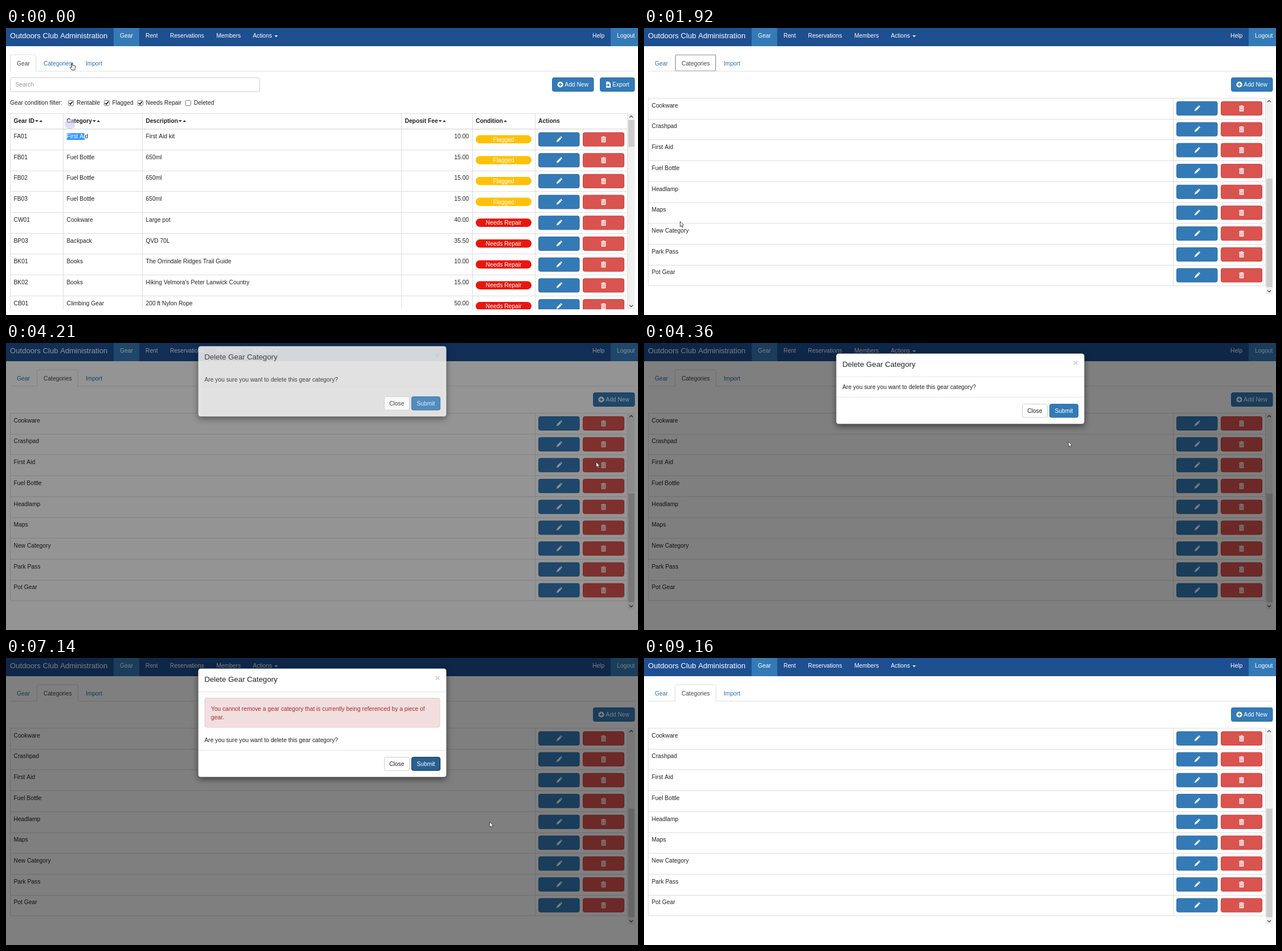
An HTML page with a canvas that plays this animation: 1110x505 px, repeating every 9.66 s.

```html
<!DOCTYPE html>
<html lang="en">
<head>
<meta charset="utf-8">
<title>Gear administration</title>
<style>
html, body { margin: 0; width: 100%; height: 100%; overflow: hidden; background: #fff; }
canvas { display: block; width: 1110px; height: 505px; }
</style>
</head>
<body>
<canvas id="stage" width="1110" height="505"></canvas>
<script>
const ctx = document.getElementById('stage').getContext('2d');
const W = 1110, H = 505, LOOP = 9660, ROW = 36.7, SIZE = 10.28;
const FAMILY = '"Liberation Sans", Arial, sans-serif';
const BLUE = '#337ab7', LINE = '#ddd', INK = '#222';
const COLUMNS = [7, 100, 239, 694, 819, 929, 1091];

const GEAR = [
  ['FA01', 'First Aid', 'First Aid kit', '10.00'],
  ['FB01', 'Fuel Bottle', '650ml', '15.00'],
  ['FB02', 'Fuel Bottle', '650ml', '15.00'],
  ['FB03', 'Fuel Bottle', '650ml', '15.00'],
  ['CW01', 'Cookware', 'Large pot', '40.00'],
  ['BP03', 'Backpack', 'QVD 70L', '35.50'],
  ['BK01', 'Books', 'The Orrindale Ridges Trail Guide', '10.00'],
  ['BK02', 'Books', "Hiking Velmora's Peter Lanwick Country", '15.00'],
  ['CB01', 'Climbing Gear', '200 ft Nylon Rope', '50.00']
];
const CATEGORIES = ['Cookware', 'Crashpad', 'First Aid', 'Fuel Bottle', 'Headlamp',
  'Maps', 'New Category', 'Park Pass', 'Pot Gear'];

// Pointer path: time, x, y
const PATH = [
  [0, 116, 61], [400, 116, 61], [760, 172, 195], [900, 180, 222], [1040, 184, 270],
  [1180, 171, 305], [1440, 110, 363], [1920, 63, 340], [2280, 66, 278], [2520, 21, 212],
  [2880, 58, 212], [3000, 62, 211], [3250, 150, 215], [3490, 803, 220], [3730, 1036, 209],
  [4210, 1036, 209], [4360, 745, 173], [4510, 728, 132], [4650, 720, 121], [4790, 724, 118],
  [5910, 724, 118], [6390, 890, 313], [7020, 890, 313], [7620, 684, 187], [7870, 684, 187],
  [7990, 712, 232]
];

const within = (t, from, to) => t >= from && t < to;

function box(x, y, w, h, color) {
  ctx.fillStyle = color;
  ctx.fillRect(x, y, w, h);
}

function text(str, x, y, color = INK, size = SIZE, align = 'left', weight = 'normal') {
  ctx.font = `${weight} ${size}px ${FAMILY}`;
  ctx.textAlign = align;
  ctx.fillStyle = color;
  ctx.fillText(str, x, y);
}

function shape(points, fill, stroke) {
  ctx.beginPath();
  points.forEach(([x, y]) => ctx.lineTo(x, y));
  ctx.closePath();
  if (fill) { ctx.fillStyle = fill; ctx.fill(); }
  if (stroke) { ctx.strokeStyle = stroke; ctx.lineWidth = 1; ctx.stroke(); }
}

function panel(x, y, w, h, r, fill, stroke) {
  ctx.beginPath();
  ctx.roundRect(x + .5, y + .5, w - 1, h - 1, r);
  if (fill) { ctx.fillStyle = fill; ctx.fill(); }
  if (stroke) { ctx.strokeStyle = stroke; ctx.lineWidth = 1; ctx.stroke(); }
}

function disc(x, y, r, color) {
  ctx.beginPath();
  ctx.arc(x, y, r, 0, 7);
  ctx.fillStyle = color;
  ctx.fill();
}

function caret(x, y, dir, color = INK) {
  shape([[x - 3, y - dir * 1.5], [x + 3, y - dir * 1.5], [x, y + dir * 1.5]], color);
}

function selected(str, x, y, from, to) {
  text(str, x, y);
  ctx.save();
  ctx.beginPath();
  ctx.rect(from, y - 9, to - from, 12);
  ctx.clip();
  box(from, y - 9, to - from, 12, '#39f');
  text(str, x, y, '#fff');
  ctx.restore();
}

function pencil(x, y) {
  ctx.save();
  ctx.translate(x, y);
  ctx.rotate(Math.PI / 4);
  box(-1.7, -3.7, 3.4, 7.2, '#fff');
  box(-1.7, -6.2, 3.4, 1.8, '#fff');
  shape([[-1.7, 3.5], [1.7, 3.5], [0, 6.8]], '#fff');
  ctx.restore();
}

function trash(x, y, back) {
  box(x - 1.7, y - 5.3, 3.4, 1.2, '#fff');
  box(x - 4.5, y - 4.3, 9, 1.4, '#fff');
  box(x - 3.8, y - 2.2, 7.6, 7.4, '#fff');
  for (const dx of [-2.3, -.4, 1.5]) box(x + dx, y - 1, .8, 5, back);
}

function rowButtons(y, mode) {
  const [fill, edge] = {
    hover: ['#c9302c', '#ac2925'],
    active: ['#ac2925', '#761c19'],
    focus: ['#c9302c', '#761c19']
  }[mode] || ['#d9534f', '#d43f3a'];
  panel(935, y - 12.5, 72.5, 25, 3, BLUE, '#2e6da4');
  pencil(971.5, y);
  panel(1013, y - 12.5, 73, 25, 3, fill, edge);
  trash(1049.5, y, fill);
}

function primary(x, w, label, labelX) {
  panel(x, 87, w, 25, 3, BLUE, '#2e6da4');
  text(label, labelX, 103.3, '#fff');
}

function addNew(x) {
  primary(x, 73.5, 'Add New', x + 22.3);
  disc(x + 14.5, 99.5, 5.1, '#fff');
  box(x + 11.5, 98.7, 6, 1.6, BLUE);
  box(x + 13.7, 96.5, 1.6, 6, BLUE);
}

function scrollbar(top, bottom, from, to) {
  box(1092, top, 12, bottom - top, '#f1f1f1');
  box(1093, from, 11, to - from, '#cdcdcd');
  ctx.strokeStyle = '#505050';
  ctx.lineWidth = 1.3;
  for (const [y, d] of [[top + 6, 1], [bottom - 6, -1]]) {
    ctx.beginPath();
    ctx.moveTo(1095, y + d * 1.5);
    ctx.lineTo(1098, y - d * 1.5);
    ctx.lineTo(1101, y + d * 1.5);
    ctx.stroke();
  }
}

function navbar() {
  box(0, 0, W, 32, '#1d4f91');
  box(189, 0, 45, 32, BLUE);
  box(1062, 0, 48, 32, BLUE);
  text('Outdoors Club Administration', 7, 18, '#fff', 13.12);
  [['Gear', 200], ['Rent', 245], ['Reservations', 288], ['Members', 369.5],
   ['Actions', 433.5], ['Help', 1030], ['Logout', 1073]]
    .forEach(([label, x]) => text(label, x, 17, '#fff'));
  caret(474.5, 14.5, 1, '#fff');
}

function tabs(t) {
  const onGear = t < 400;
  const [x, w] = onGear ? [7, 46] : [54, 73];
  if (within(t, 120, 400)) panel(54, 47, 73, 29, 3, '#eee', '#bbb');
  box(7, 75.5, 1097, 1, LINE);
  panel(x, 46.5, w, 32, 3, '#fff', LINE);
  box(x - 1, 76.5, w + 2, 3, '#fff');
  if (within(t, 400, 2520)) panel(55, 47, 71, 29, 0, null, '#999');
  text('Gear', 19, 65.5, onGear ? '#444' : '#2a71b0');
  text('Categories', 66, 65.5, onGear ? '#2a71b0' : '#444');
  text('Import', 140, 65.5, '#2a71b0');
}

function checkbox(x, label, labelX, on) {
  panel(x, 127, 10, 10, 1, '#fff', '#777');
  if (on) {
    ctx.beginPath();
    ctx.moveTo(x + 2, 132);
    ctx.lineTo(x + 4.2, 134.3);
    ctx.lineTo(x + 8, 129.3);
    ctx.strokeStyle = '#111';
    ctx.lineWidth = 1.6;
    ctx.stroke();
  }
  text(label, labelX, 135);
}

function gearPane() {
  panel(7, 87, 439, 25.5, 3, '#fff', '#ccc');
  text('Search', 16.5, 103.3, '#999');
  addNew(959);
  primary(1043, 61.5, 'Export', 1065);
  shape([[1054, 94.5], [1059, 94.5], [1062, 97.5], [1062, 105], [1054, 105]], '#fff');
  box(1052, 99.7, 6, 1.4, BLUE);
  shape([[1057, 97.8], [1060.3, 100.4], [1057, 103]], BLUE);

  text('Gear condition filter:', 7, 134.5);
  checkbox(109, 'Rentable', 124, true);
  checkbox(172, 'Flagged', 186.5, true);
  checkbox(231, 'Needs Repair', 245.5, true);
  checkbox(315, 'Deleted', 330, false);

  ctx.save();
  ctx.beginPath();
  ctx.rect(0, 150, W, 345);
  ctx.clip();
  COLUMNS.forEach(x => box(x, 150, 1, 345, LINE));
  box(7, 150, 1085, 1, LINE);
  box(7, 177, 1085, 1.5, LINE);
  [['Gear ID', 13.5, 54], ['Category', 106.5, 155], ['Description', 245.5, 306],
   ['Deposit Fee', 700.5, 762.5], ['Condition', 825], ['Actions', 935]]
    .forEach(([label, x, sort]) => {
      text(label, x, 167, INK, SIZE, 'left', 'bold');
      if (sort) { caret(sort, 163.7, 1); caret(sort + 7.3, 163.7, -1); }
    });
  caret(877, 163.7, -1);

  GEAR.forEach(([id, category, about, fee], i) => {
    const y = 177.5 + i * ROW, base = Math.round(y + 16.5), flagged = i < 4;
    if (i) box(7, Math.round(y - .4), 1085, 1, LINE);
    text(id, 13.5, base);
    if (i) text(category, 106.5, base);
    else selected(category, 106.5, base, 106.5, 138.5);
    text(about, 245.5, base);
    text(fee, 813, base, INK, SIZE, 'right');
    ctx.beginPath();
    ctx.roundRect(825, y + 11, 98, 14.6, 7.3);
    ctx.fillStyle = flagged ? '#ffc107' : '#e8170c';
    ctx.fill();
    text(flagged ? 'Flagged' : 'Needs Repair', 874, y + 22, '#fff', SIZE, 'center');
    rowButtons(y + 18.5);
  });
  ctx.restore();
  scrollbar(150, 495, 162, 209);
}

function trashMode(t) {
  if (within(t, 3730, 3970)) return 'hover';
  if (within(t, 3970, 4210)) return 'active';
  if (within(t, 8250, 9160)) return 'focus';
}

function categoryPane(t, px) {
  addNew(1031);
  [7, 929, 1091].forEach(x => box(x, 123, 1, 331, LINE));
  for (let i = 0; i < 10; i++) box(7, Math.round(123 + i * ROW), 1085, 1, LINE);
  CATEGORIES.forEach((name, i) => {
    const y = 123 + i * ROW, base = Math.round(y + 16.7);
    if (i === 2 && within(t, 2640, 3970)) selected(name, 13.5, base, 20, t < 2880 ? Math.min(51, px) : 51);
    else text(name, 13.5, base);
    rowButtons(y + 18.5, i === 2 && trashMode(t));
  });
  scrollbar(123, 469, 265, 456);
}

function page(t, px) {
  navbar();
  tabs(t);
  if (t < 640) gearPane();
  else categoryPane(t, px);
  // Veil over the pane while it fades
  const veil = t < 400 ? 0 : t < 520 ? .35 : t < 640 ? .9 : t < 760 ? .7 : t < 900 ? .15 : 0;
  if (veil) box(0, 80, W, H - 80, `rgba(255,255,255,${veil})`);
  if (t < 260) {
    ctx.globalAlpha = t < 120 ? .6 : .25;
    disc(112.5, 169, 9.3, '#c9cbf3');
  }
  if (within(t, 3000, 3970)) disc(81, 193, 9.2, '#d3d2f5');
  ctx.globalAlpha = 1;
}

function modal(t) {
  const entering = t < 4360;
  const failed = within(t, 5290, 7990);
  const top = entering ? 5 : t < 7990 ? 18 : 17.5;
  const d = failed ? 67 : 0;
  ctx.save();
  ctx.translate(0, top - 18);
  ctx.globalAlpha = entering ? .82 : t < 7990 ? 1 : .985;

  ctx.save();
  ctx.shadowColor = 'rgba(0,0,0,.5)';
  ctx.shadowBlur = 11;
  ctx.shadowOffsetY = 4;
  panel(337, 18, 437, 125 + d, 4.5, '#fff');
  ctx.restore();
  panel(337, 18, 437, 125 + d, 4.5, null, 'rgba(0,0,0,.2)');
  text('Delete Gear Category', 348.5, 42.3, INK, 13.2);
  text('×', 758, 40, '#ccc', 15.4, 'center', 'bold');
  box(338, 59, 435, 1, '#e5e5e5');

  if (failed) {
    panel(348.5, 70, 414, 52.5, 3, '#f2dede', '#ebccd1');
    text('You cannot remove a gear category that is currently being referenced by a piece of', 360, 93, '#a0302e');
    text('gear.', 360, 107.5, '#a0302e');
  }
  text('Are you sure you want to delete this gear category?', 348.5, 80.5 + d);
  box(338, 95 + d, 435, 1, '#e5e5e5');

  const close = t >= 7870 ? ['#e6e6e6', '#8c8c8c'] : t >= 7500 ? ['#e6e6e6', '#adadad'] : ['#fff', '#ccc'];
  panel(664, 107 + d, 45, 24.5, 3, ...close);
  text('Close', 686.3, 122.5 + d, INK, SIZE, 'center');

  let submit = [BLUE, '#2e6da4'];
  if (within(t, 4650, 5040)) submit = ['#286090', '#204d74'];
  if (within(t, 5040, 5290)) submit = ['#204d74', '#122b40'];
  if (within(t, 5290, 7870)) submit = ['#286090', '#122b40'];
  panel(712, 107 + d, 51, 24.5, 3, ...submit);
  text('Submit', 737.5, 122.5 + d, '#fff', SIZE, 'center');
  ctx.restore();
}

function pointerAt(t) {
  const i = PATH.findIndex(key => key[0] > t);
  if (i < 0) return PATH[PATH.length - 1].slice(1);
  const [t0, x0, y0] = PATH[i - 1], [t1, x1, y1] = PATH[i];
  const steps = Math.max(1, Math.round((t1 - t0) / 120));
  const u = Math.floor((t - t0) / (t1 - t0) * steps) / steps;
  return [x0 + (x1 - x0) * u, y0 + (y1 - y0) * u];
}

function pointer(t, x, y) {
  const hand = t < 520 || within(t, 3730, 4210) || within(t, 4650, 5290) || within(t, 7500, 7990);
  ctx.save();
  ctx.translate(Math.round(x) + .5, Math.round(y) + .5);
  if (hand) {
    shape([[-1, 0], [.5, 0], [.5, 4], [5, 5], [5, 9], [4, 12.5], [-1, 12.5],
      [-4, 8], [-3.5, 6.5], [-1, 8]], '#fff', '#333');
  } else if (within(t, 2520, 3250)) {
    box(-.5, -6, 1, 12, '#333');
    box(-2.5, -6, 5, 1, '#333');
    box(-2.5, 5, 5, 1, '#333');
  } else {
    shape([[0, 0], [0, 9], [2, 7.2], [3.5, 10.5], [5, 9.8], [3.6, 6.7], [6, 6.3]], '#fff', '#444');
  }
  ctx.restore();
}

function draw(t) {
  const [px, py] = pointerAt(t);
  box(0, 0, W, H, '#fff');
  page(t, px);
  if (within(t, 4210, 8250)) {
    const dim = t < 4360 ? .42 : t < 8110 ? .5 : .03;
    box(0, 0, W, H, `rgba(0,0,0,${dim})`);
  }
  if (within(t, 4210, 8110)) modal(t);
  if (t < 8110) pointer(t, px, py);
}

const start = performance.now();
function tick() {
  draw((performance.now() - start) % LOOP);
  requestAnimationFrame(tick);
}
tick();
</script>
</body>
</html>
```
